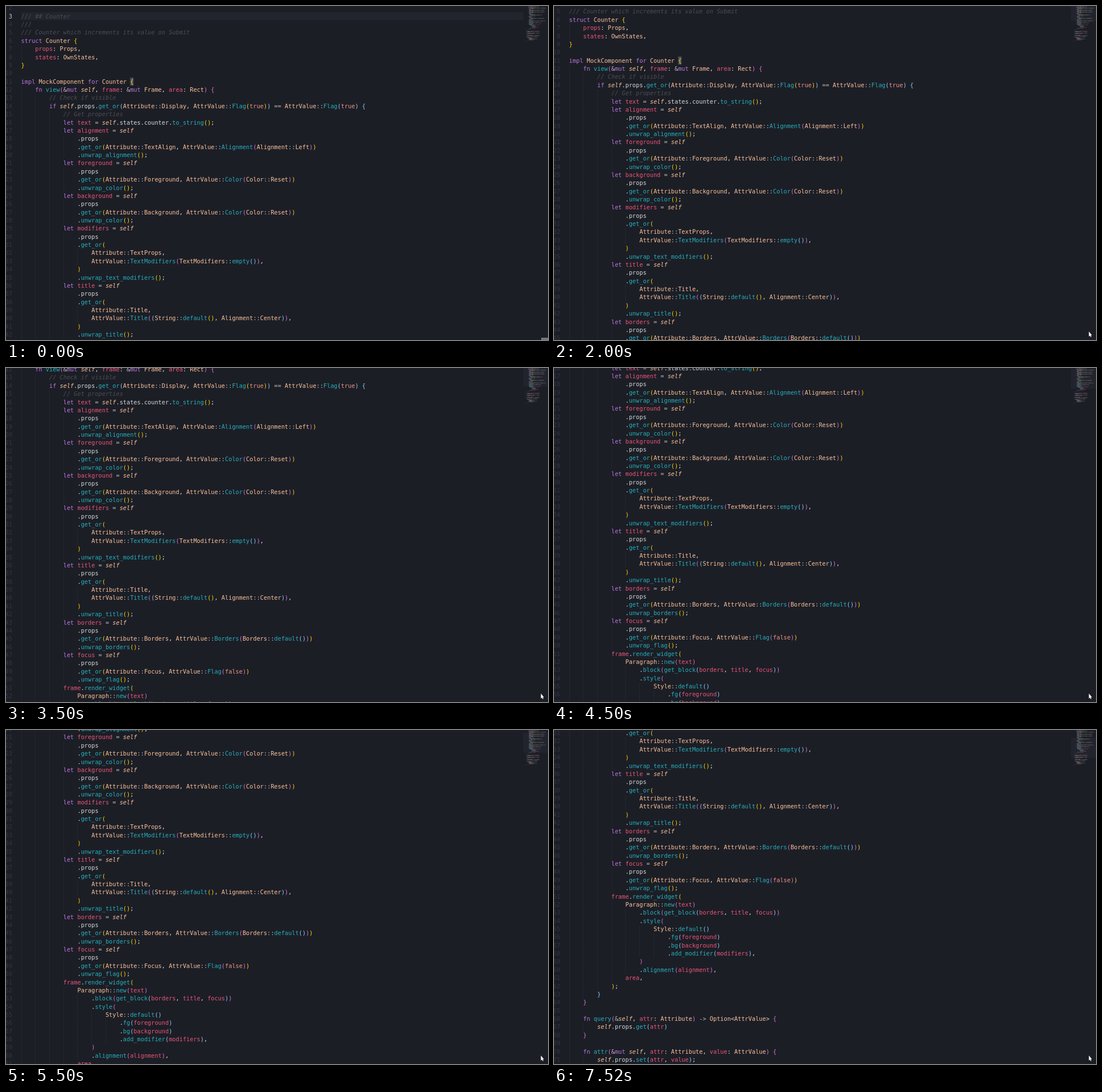
An HTML page with a canvas for the animation above (8000 ms loop, 953 by 588 pixels).

```html
<!DOCTYPE html>
<html lang="en">
<head>
<meta charset="utf-8">
<title>Scrolling code editor</title>
<style>
  html, body { margin: 0; width: 100%; height: 100%; overflow: hidden; background: #1c1e26; }
  canvas { display: block; }
</style>
</head>
<body>
<canvas id="stage" width="953" height="588"></canvas>
<script>
const W = 953, H = 588, LOOP = 8000;
const CELL = 6.18, PITCH = 14.37, LEFT = 26.6, FIRST = -10.7;
const FONT = '10.27px "DejaVu Sans Mono", "Noto Sans Mono", monospace';

const code = `

/// ## Counter
///
/// Counter which increments its value on Submit
struct Counter {
    props: Props,
    states: OwnStates,
}

impl MockComponent for Counter {
    fn view(&mut self, frame: &mut Frame, area: Rect) {
        // Check if visible
        if self.props.get_or(Attribute::Display, AttrValue::Flag(true)) == AttrValue::Flag(true) {
            // Get properties
            let text = self.states.counter.to_string();
            let alignment = self
                .props
                .get_or(Attribute::TextAlign, AttrValue::Alignment(Alignment::Left))
                .unwrap_alignment();
            let foreground = self
                .props
                .get_or(Attribute::Foreground, AttrValue::Color(Color::Reset))
                .unwrap_color();
            let background = self
                .props
                .get_or(Attribute::Background, AttrValue::Color(Color::Reset))
                .unwrap_color();
            let modifiers = self
                .props
                .get_or(
                    Attribute::TextProps,
                    AttrValue::TextModifiers(TextModifiers::empty()),
                )
                .unwrap_text_modifiers();
            let title = self
                .props
                .get_or(
                    Attribute::Title,
                    AttrValue::Title((String::default(), Alignment::Center)),
                )
                .unwrap_title();
            let borders = self
                .props
                .get_or(Attribute::Borders, AttrValue::Borders(Borders::default()))
                .unwrap_borders();
            let focus = self
                .props
                .get_or(Attribute::Focus, AttrValue::Flag(false))
                .unwrap_flag();
            frame.render_widget(
                Paragraph::new(text)
                    .block(get_block(borders, title, focus))
                    .style(
                        Style::default()
                            .fg(foreground)
                            .bg(background)
                            .add_modifier(modifiers),
                    )
                    .alignment(alignment),
                area,
            );
        }
    }

    fn query(&self, attr: Attribute) -> Option<AttrValue> {
        self.props.get(attr)
    }

    fn attr(&mut self, attr: Attribute, value: AttrValue) {
        self.props.set(attr, value);
    }

    fn state(&self) -> State {
        State::One(StateValue::Isize(self.states.counter))
    }

    fn perform(&mut self, cmd: Cmd) -> CmdResult {
        match cmd {
            Cmd::Submit => {
                self.states.incr();
                CmdResult::Changed(self.state())
            }
            _ => CmdResult::None,
        }
    }
}`.split('\n');

const color = {
  plain: '#d5d8da', operator: '#bbbbbb', comment: '#4c4d53', keyword: '#b877db',
  type: '#fac29a', call: '#25b0bc', name: '#e95678', literal: '#f09483'
};
const brackets = ['#ffd700', '#da70d6', '#87cefa'];
const keywords = /^(struct|impl|for|fn|let|if|mut|match)$/;

// [time, scroll offset]; the view jumps at each step
const steps = [
  [0, 0], [2000, 37], [2500, 73], [3000, 109], [3500, 145], [4000, 175], [4500, 205],
  [5000, 234], [5500, 264], [6000, 301], [6520, 339], [7020, 377], [7520, 415]
];

function wordColor(word, before, after) {
  if (keywords.test(word)) return color.keyword;
  if (word === 'self') return color.type;
  if (word === 'true' || word === 'false') return color.literal;
  if (after === '(') return color.call;
  if (/^[A-Z]/.test(word)) return color.type;
  return before === '.' ? color.plain : color.name;
}

function tokenize(lines) {
  let depth = 0;
  return lines.map(line => {
    const tokens = [];
    for (const m of line.matchAll(/\/\/.*|\w+|::|[-=]>|==|\S/g)) {
      const text = m[0], col = m.index;
      let fill = color.plain, italic = false;
      if (text.startsWith('//')) {
        fill = color.comment;
        italic = true;
      } else if (/\w/.test(text)) {
        fill = wordColor(text, line[col - 1], line[col + text.length]);
        italic = text === 'self';
      } else if ('({'.includes(text)) {
        fill = brackets[depth++ % 3];
      } else if (')}'.includes(text)) {
        fill = brackets[--depth % 3];
      } else if (/^(::|[-=]>|==|=|&)$/.test(text)) {
        fill = color.operator;
      }
      tokens.push({ text, col, fill, italic });
    }
    return tokens;
  });
}

function layer(w, h) {
  const canvas = document.createElement('canvas');
  canvas.width = w;
  canvas.height = h;
  return canvas;
}

const rows = tokenize(code);
const lineY = n => FIRST + (n - 1) * PITCH;

function write(g, text, x, y) {
  [...text].forEach((ch, i) => {
    if (ch !== ' ') g.fillText(ch, x + i * CELL, y);
  });
}

function drawCode() {
  const page = layer(W, Math.ceil(code.length * PITCH));
  const g = page.getContext('2d');

  g.fillStyle = '#22242e';
  g.fillRect(LEFT, 11, 910 - LEFT, 14);
  g.fillStyle = '#4a4c58';
  g.fillRect(LEFT + 31 * CELL, lineY(11) - 7, CELL, 14);

  rows.forEach((tokens, i) => {
    const n = i + 1, y = lineY(n), base = y + 3.7;
    const inside = !tokens.length && n > 11;
    const indent = inside ? 4 : tokens.length ? tokens[0].col : 0;

    g.fillStyle = '#242630';
    for (let col = 0; col < indent; col += 4) {
      g.fillRect(Math.round(LEFT + col * CELL), y - PITCH / 2, 1, PITCH);
    }

    g.font = FONT;
    g.fillStyle = n === 3 ? '#c4c7ca' : '#343640';
    const label = String(n);
    write(g, label, 11 - label.length * CELL, base);

    for (const t of tokens) {
      g.font = (t.italic ? 'italic ' : '') + FONT;
      g.fillStyle = t.fill;
      write(g, t.text, LEFT + t.col * CELL, base);
    }
  });
  return page;
}

const mapY = n => 44 + (n - 66) * 0.86;

function drawMap() {
  const map = layer(W, 80);
  const g = map.getContext('2d');
  g.globalAlpha = 0.6;
  rows.forEach((tokens, i) => {
    for (const t of tokens) {
      g.fillStyle = t.fill;
      g.fillRect(913 + t.col * 0.43, mapY(i + 1), t.text.length * 0.43, 0.6);
    }
  });
  return map;
}

const ctx = document.getElementById('stage').getContext('2d');
const page = drawCode();
const map = drawMap();
const pointer = new Path2D('M940.5 573 V582 L942.4 580.3 L943.7 583 L945 582.4 L943.8 579.8 H946 Z');

function draw(time) {
  const scroll = steps.findLast(s => s[0] <= time)[1];
  ctx.fillStyle = '#1c1e26';
  ctx.fillRect(0, 0, W, H);
  ctx.drawImage(page, 0, -scroll);

  if (time >= 1000) {
    ctx.fillStyle = 'rgba(108, 111, 147, 0.07)';
    ctx.fillRect(909, mapY(2 + scroll / PITCH), 44, 41 * 0.86);
  }
  ctx.drawImage(map, 0, 0);

  if (time < 500) {
    ctx.fillStyle = '#75777d';
    ctx.fillRect(941, 584, 12, 4);
  }
  if (time >= 1000) {
    ctx.strokeStyle = '#08090c';
    ctx.lineWidth = 1;
    ctx.stroke(pointer);
    ctx.fillStyle = '#ffffff';
    ctx.fill(pointer);
  }
}

function tick() {
  draw(performance.now() % LOOP);
  requestAnimationFrame(tick);
}
tick();
</script>
</body>
</html>
```
